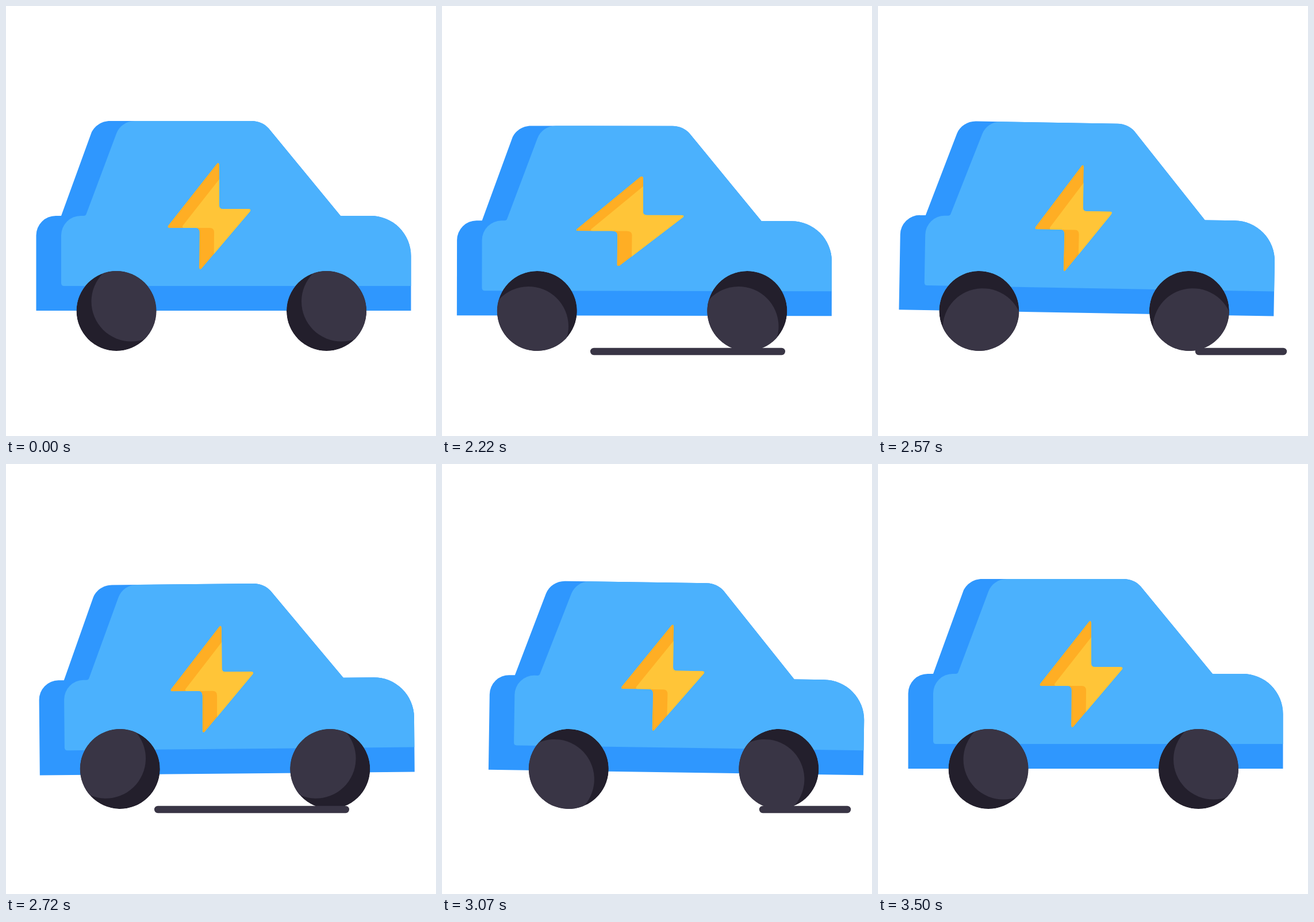
An HTML page that plays this animation: 748 by 748 pixels, repeating every 3520 ms.

```html
<!DOCTYPE html>
<html lang="en">
<head>
<meta charset="utf-8">
<title>Electric car</title>
<style>
  html, body { margin: 0; width: 100%; height: 100%; overflow: hidden; background: #fff; }
  svg { display: block; width: 100%; height: 100%; }
</style>
</head>
<body>
<svg viewBox="0 0 748 748">
  <defs>
    <path id="bolt" d="M371 276V347Q371 353 377 353H422C426 353 426 356 424 358L340 457C338 459 336 458 336 455L336.500 394Q336.500 386 329 386H284C281 386 281 384 282 382L367 274C369 272 371 273 371 276Z"/>
    <clipPath id="boltClip"><use href="#bolt" class="flip"/></clipPath>
    <clipPath id="tyreClip"><circle r="69.500"/></clipPath>
    <g id="wheel" clip-path="url(#tyreClip)">
      <circle r="69.500" fill="#231f2c"/>
      <circle cx="26" cy="-16.500" r="69.500" fill="#393545"/>
    </g>
  </defs>
  <g id="car">
    <g id="body">
      <path fill="#2f97fe" d="M52.500 530V399A34 34 0 0 1 86.500 365H96L148 222C153 209 166 200 181 200H427C439 200 450 205 457 213L582 365H634A70 70 0 0 1 704.500 435V530Z"/>
      <path fill="#4bb1fd" d="M96 482V399A34 34 0 0 1 130 365H135Q139 365 140 361L192 222C197 209 209 200 224 200H427C439 200 450 205 457 213L582 365H634A70 70 0 0 1 704.500 435V487H101Q96 487 96 482Z"/>
      <g clip-path="url(#boltClip)">
        <use href="#bolt" class="flip" fill="#ffae24"/>
        <g transform="translate(25.500)"><use href="#bolt" class="flip" fill="#ffc538"/></g>
      </g>
    </g>
    <g transform="translate(192 530.500)"><use href="#wheel" class="spin"/></g>
    <g transform="translate(557.500 530.500)"><use href="#wheel" class="spin"/></g>
  </g>
  <line id="dash" y1="601" y2="601" stroke="#393545" stroke-width="12.500" stroke-linecap="round"/>
</svg>
<script>
const LOOP = 3520, START = 2000, END = 3500, KEY = 100 / 3;

// Keys are [position in units of KEY, value], joined by a sine ease.
const tracks = {
  x: [[0, 0], [10, -35], [30, 30], [45, 0]],
  y: [[0, 0], [7, 8.8], [14, 0], [21, 8.8], [28, 0], [35, 9.8], [42, 0]],
  tilt: [[0, 0], [3, 1], [11, -1], [17, 1], [24, -1], [31, 1], [38, -1], [42, 0]],
  boltX: [[0, 1], [7, 1.3], [12, -1], [18, 1]],
  boltY: [[0, 1], [7, .843], [12, 1]]
};

const $ = id => document.getElementById(id);
const clamp = (v, lo, hi) => Math.min(hi, Math.max(lo, v));
const setAll = (selector, value) =>
  document.querySelectorAll(selector).forEach(el => el.setAttribute('transform', value));

function at(keys, k) {
  const i = keys.findIndex(key => key[0] > k);
  if (i < 0) return keys[keys.length - 1][1];
  const [k0, v0] = keys[i - 1], [k1, v1] = keys[i];
  return v0 + (v1 - v0) * (1 - Math.cos(Math.PI * (k - k0) / (k1 - k0))) / 2;
}

function bezier(x1, y1, x2, y2, x) {
  const curve = (a, b, s) => 3 * (1 - s) * s * ((1 - s) * a + s * b) + s ** 3;
  let lo = 0, hi = 1;
  for (let i = 0; i < 24; i++) {
    const mid = (lo + hi) / 2;
    if (curve(x1, x2, mid) < x) lo = mid; else hi = mid;
  }
  return curve(y1, y2, lo);
}

function draw(time) {
  // Pictures change 40 times a second, on whole hundredths.
  const rest = time % 50;
  const t = clamp(time - rest + (rest < 20 ? 0 : 25), START, END) - START;
  const pose = {};
  for (const name in tracks) pose[name] = at(tracks[name], t / KEY);

  $('car').setAttribute('transform', `translate(${pose.x})`);
  $('body').setAttribute('transform', `translate(0 ${pose.y}) rotate(${pose.tilt} 378 530)`);
  setAll('.flip', `translate(353.5 365.5) scale(${pose.boltX} ${pose.boltY}) translate(-353.5 -365.5)`);
  setAll('.spin', `rotate(${1080 * bezier(.2, .1, .7, 1, t / (END - START))})`);

  const phase = t % 500, speed = 653 / 333.3;
  const head = clamp(705 - phase * speed, 52, 705);
  const tail = clamp(705 - (phase - 166.7) * speed, 52, 705);
  $('dash').setAttribute('x1', head);
  $('dash').setAttribute('x2', tail);
  $('dash').style.display = head < tail ? '' : 'none';
}

let begin;
function tick(now) {
  begin ??= now;
  draw((now - begin) % LOOP);
  requestAnimationFrame(tick);
}
draw(0);
requestAnimationFrame(tick);
</script>
</body>
</html>
```
